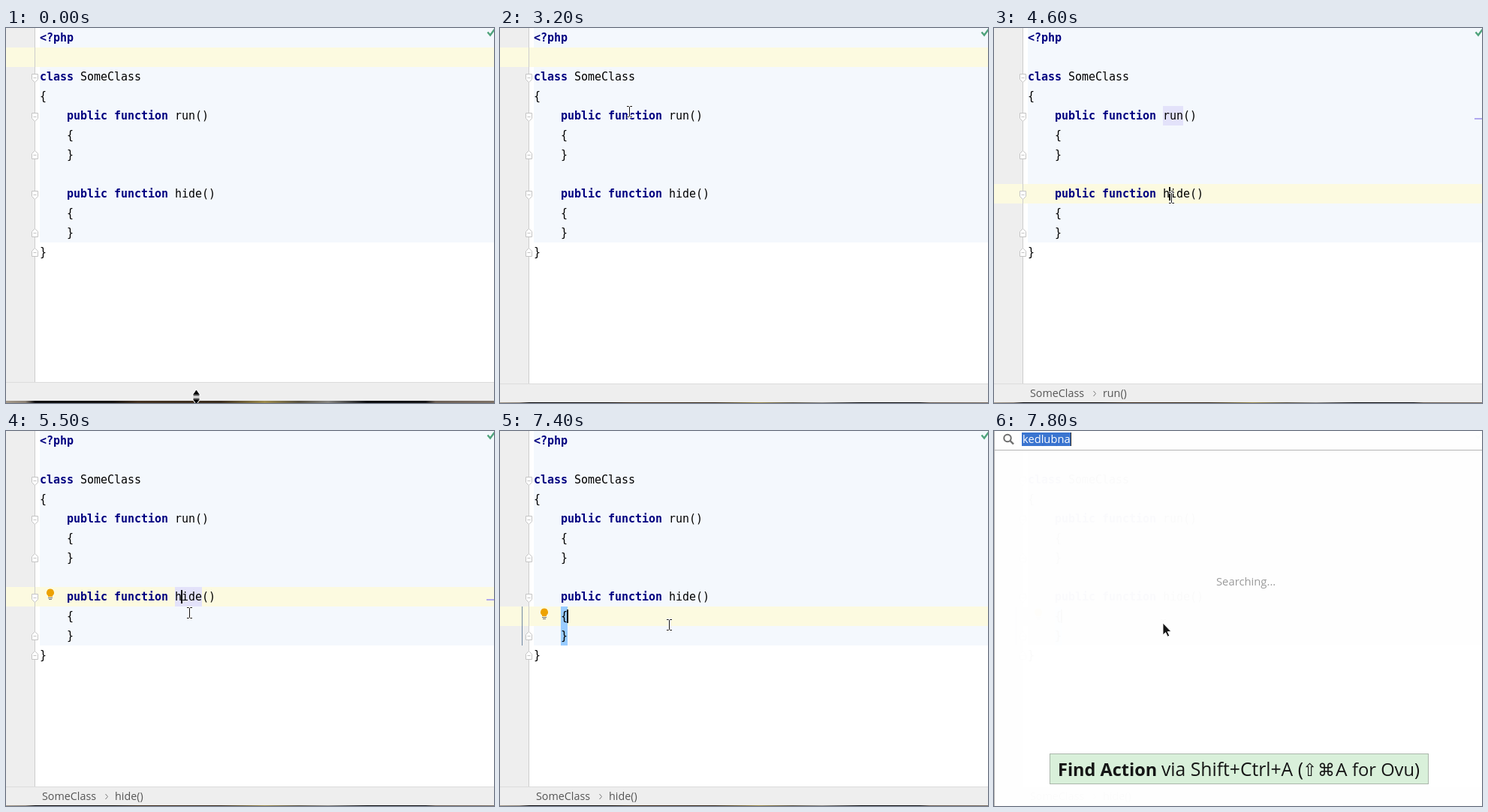
An HTML page for the animation above (8 s loop, 650x500 px).

```html
<!DOCTYPE html>
<html lang="en">
<head>
<meta charset="utf-8">
<title>Editor</title>
<style>
  html, body { margin: 0; width: 100%; height: 100%; overflow: hidden; background: #fff; }
  svg { display: block; width: 650px; height: 500px; }
  text { white-space: pre; }
  .code { font: 15px "DejaVu Sans Mono", monospace; letter-spacing: -0.03px; }
  .keyword { font-weight: bold; fill: #000080; }
  .ui { font-family: "Open Sans", "Noto Sans", sans-serif; }
  .keys { font-family: "DejaVu Sans", sans-serif; }
  .marker { fill: #fff; stroke: #c4c4c4; }
  .row { fill: #fcfae0; }
  .word { fill: #e3e2fa; }
  .brace { fill: #99ccff; }
</style>
</head>
<body>
<svg viewBox="0 0 650 500">
  <defs>
    <linearGradient id="photo">
      <stop offset="0" stop-color="#a59a8b"/>
      <stop offset=".04" stop-color="#8b8175"/>
      <stop offset=".06" stop-color="#0b0b0d"/>
      <stop offset=".22" stop-color="#15120f"/>
      <stop offset=".27" stop-color="#42301f"/>
      <stop offset=".44" stop-color="#3a2c1c"/>
      <stop offset=".53" stop-color="#9c8a4c"/>
      <stop offset=".6" stop-color="#57503f"/>
      <stop offset=".66" stop-color="#85837f"/>
      <stop offset=".74" stop-color="#0c0d10"/>
      <stop offset=".86" stop-color="#141416"/>
      <stop offset=".88" stop-color="#6d6056"/>
      <stop offset="1" stop-color="#7d7166"/>
    </linearGradient>
    <path id="beam" d="M-3.5-7h2.5l1 1 1-1h2.5M0-6V6M-3.5 7h2.5l1-1 1 1h2.5" fill="none"/>
    <path id="resize" d="M0-9l4 6h-8zM-4-1.5h8M-4 1.5h8M0 9l4-6h-8z"/>
    <path id="foldStart" d="M34.5-5.5h8v7l-4 4-4-4zM36.5-.5h4"/>
    <path id="foldEnd" d="M34.5 5.5h8v-7l-4-4-4 4zM36.5.5h4"/>
  </defs>

  <rect width="650" height="500" fill="#fff"/>
  <rect x="45" width="605" height="286" fill="#f4f8fd"/>
  <rect width="38" height="500" fill="#eee"/>
  <rect id="gutterRow" class="row" width="45" height="26"/>
  <rect id="row" class="row" x="45" width="605" height="26"/>
  <path d="M38.5 0V500" stroke="#cdcdcd"/>
  <rect id="word" class="word" x="225" height="26"/>
  <rect id="stripe" x="640" width="10" height="2" fill="#b0a8f0"/>
  <path id="scope" d="M29.5 234v52" stroke="#6f87a3"/>
  <rect id="openBrace" class="brace" x="81" y="234" width="9" height="26"/>
  <rect id="closeBrace" class="brace" x="81" y="260" width="9" height="26"/>
  <g id="folds" class="marker"></g>
  <g id="lines" class="code"></g>
  <path d="M641.5 5.5l3.5 4 6-8" fill="none" stroke="#4fa37c" stroke-width="2.4"/>
  <g id="bulb">
    <path d="M59 236.5a5 5 0 0 1 3 9v1.5h-6v-1.5a5 5 0 0 1 3-9z" fill="#eda200"/>
    <path d="M56 248.5h6M57 250.5h4" stroke="#6e6e6e"/>
  </g>
  <rect id="caret" width="2" height="18"/>

  <g id="panel">
    <rect width="650" height="30" fill="#eee"/>
    <path d="M0 .5H650" stroke="#dcdcdc"/>
    <rect y="25" width="650" height="6" fill="url(#photo)"/>
  </g>
  <g id="crumbs" class="ui" font-size="14.3" fill="#555">
    <text x="48" y="492">SomeClass</text>
    <path d="M132.5 484l3 3.5-3 3.5" fill="none" stroke="#777"/>
    <text id="crumb" x="145" y="492"></text>
  </g>

  <g id="beamCursor">
    <use href="#beam" stroke="#fff" stroke-width="3"/>
    <use href="#beam" stroke="#111"/>
  </g>
  <g id="resizeCursor">
    <use href="#resize" stroke="#fff" stroke-width="2.5"/>
    <use href="#resize" stroke="#111" stroke-width=".7"/>
  </g>

  <g id="popup" class="ui">
    <rect width="650" height="500" fill="#fff"/>
    <path d="M.5 0V500M0 25.5H650" stroke="#b4b4b4"/>
    <circle cx="18" cy="9.5" r="4.7" fill="none" stroke="#6b6b6b" stroke-width="2"/>
    <path d="M21.5 13l4.5 4.5" stroke="#6b6b6b" stroke-width="2.4"/>
    <rect x="37" y="2" width="65" height="18" fill="#3873d0"/>
    <path d="M102.5 2v18" stroke="#222"/>
    <text x="38" y="16" font-size="14.7" fill="#fff">kedlubna</text>
    <text x="296" y="206" font-size="14.8" fill="#999">Searching...</text>
    <path d="M225 256v16l3.6-3.4 2.6 5.6 2.6-1.2-2.6-5.4h4.8z" fill="#111" stroke="#fff" stroke-width=".9"/>
    <rect x="74.5" y="430.5" width="504" height="40" fill="#d9f0da" stroke="#a9b5a9"/>
    <g fill="#111">
      <text x="85" y="460" font-size="23.5" font-weight="bold">Find Action</text>
      <text x="223" y="460" font-size="24.7">via Shift+Ctrl+A (</text>
      <text class="keys" x="411" y="460" font-size="23">⇧</text>
      <text class="keys" x="431" y="460" font-size="23">⌘</text>
      <text x="455" y="460" font-size="24.5">A</text>
      <text x="477" y="460" font-size="23.7">for Ovu)</text>
    </g>
  </g>
</svg>
<script>
const LOOP = 8000, ROW = 26, LEFT = 45, CHAR = 9;
const $ = id => document.getElementById(id);

function add(parent, tag, attrs, content = "") {
  const node = document.createElementNS(parent.namespaceURI, tag);
  for (const name in attrs) node.setAttribute(name, attrs[name]);
  node.textContent = content;
  parent.append(node);
}

// row, indent, keyword, plain text
const code = [
  [0, 0, "<?php", ""],
  [2, 0, "class", "SomeClass"],
  [3, 0, "", "{"],
  [4, 4, "public function", "run()"],
  [5, 4, "", "{"],
  [6, 4, "", "}"],
  [8, 4, "public function", "hide()"],
  [9, 4, "", "{"],
  [10, 4, "", "}"],
  [11, 0, "", "}"]
];
for (const [row, indent, keyword, plain] of code) {
  const y = row * ROW + 18, x = LEFT + indent * CHAR;
  if (keyword) add($("lines"), "text", { x, y, class: "keyword" }, keyword);
  const gap = keyword ? (keyword.length + 1) * CHAR : 0;
  if (plain) add($("lines"), "text", { x: x + gap, y }, plain);
}

const folds = { foldStart: [2, 4, 8], foldEnd: [6, 10, 11] };
for (const kind in folds)
  for (const row of folds[kind])
    add($("folds"), "use", { href: "#" + kind, y: row * ROW + (kind === "foldStart" ? 15 : 13) });

// Each step changes part of the state; caret is [column, row].
const steps = [
  [0, { panel: 472, resize: 492, beam: null, row: 1, gutter: 1, caret: null, word: null,
        crumb: "", scope: false, closeBrace: false, bulb: null, popup: 0 }],
  [100, { panel: 474, resize: 494 }],
  [300, { resize: null, beam: [226, 400] }],
  [400, { beam: [200, 298], caret: [0, 1] }],
  [700, { beam: [194, 268] }],
  [800, { beam: [183, 228] }],
  [900, { beam: [177, 205], caret: null }],
  [1100, { beam: [149, 118] }],
  [1200, { beam: [142, 109] }],
  [1400, { caret: [0, 1] }],
  [1900, { caret: null }],
  [2600, { caret: [0, 1] }],
  [3100, { beam: [150, 110], caret: null }],
  [3200, { beam: [172, 112] }],
  [3300, { beam: [200, 115] }],
  [3400, { beam: [223, 117] }],
  [3500, { beam: [235, 118] }],
  [3600, { beam: [239, 119], row: 4, caret: [22, 4] }],
  [3900, { gutter: 4, crumb: "run()" }],
  [4000, { word: 4, beam: [239, 124] }],
  [4100, { caret: null, beam: [239, 145] }],
  [4200, { beam: [238, 175] }],
  [4300, { beam: [237, 205] }],
  [4400, { beam: [236, 222] }],
  [4500, { beam: [236, 227], row: 8, caret: [21, 8] }],
  [4600, { gutter: 8 }],
  [4800, { crumb: "hide()" }],
  [4900, { word: null }],
  [5000, { word: 8, caret: null }],
  [5400, { bulb: 8, beam: [240, 232] }],
  [5500, { caret: [21, 8], beam: [244, 243] }],
  [5600, { beam: [240, 252] }],
  [5900, { beam: [228, 252], row: 9, gutter: 9, caret: [5, 9], bulb: null,
           scope: true, closeBrace: true }],
  [6000, { word: null }],
  [6200, { beam: [225, 259] }],
  [6600, { bulb: 9 }],
  [7000, { caret: null, closeBrace: false }],
  [7400, { caret: [5, 9], closeBrace: true }],
  [7700, { popup: .5 }],
  [7800, { popup: .98 }]
];

const stateAt = time =>
  Object.assign({}, ...steps.filter(([start]) => start <= time).map(step => step[1]));

const show = (id, on) => $(id).setAttribute("visibility", on ? "visible" : "hidden");
const move = (id, x, y) => $(id).setAttribute("transform", `translate(${x} ${y})`);

function place(id, position) {
  show(id, position);
  if (position) move(id, ...position);
}

function draw(time) {
  const s = stateAt(time);
  move("panel", 0, s.panel);
  move("row", 0, s.row * ROW);
  move("gutterRow", 0, s.gutter * ROW);
  place("resizeCursor", s.resize && [253.5, s.resize]);
  place("beamCursor", s.beam && [s.beam[0] + .5, s.beam[1] - .5]);
  place("caret", s.caret && [LEFT + s.caret[0] * CHAR - (s.caret[0] ? 1 : 0), s.caret[1] * ROW + 4]);
  place("word", s.word && [0, s.word * ROW]);
  $("word").setAttribute("width", s.word === 8 ? 36 : 27);
  place("stripe", s.word && [0, s.word * ROW + 16]);
  place("bulb", s.bulb && [0, (s.bulb - 9) * ROW]);
  show("scope", s.scope);
  show("openBrace", s.scope);
  show("closeBrace", s.closeBrace);
  show("crumbs", s.crumb);
  $("crumb").textContent = s.crumb;
  $("popup").setAttribute("opacity", s.popup);
}

const origin = performance.now();
function tick() {
  draw((performance.now() - origin) % LOOP);
  requestAnimationFrame(tick);
}
tick();
</script>
</body>
</html>
```
